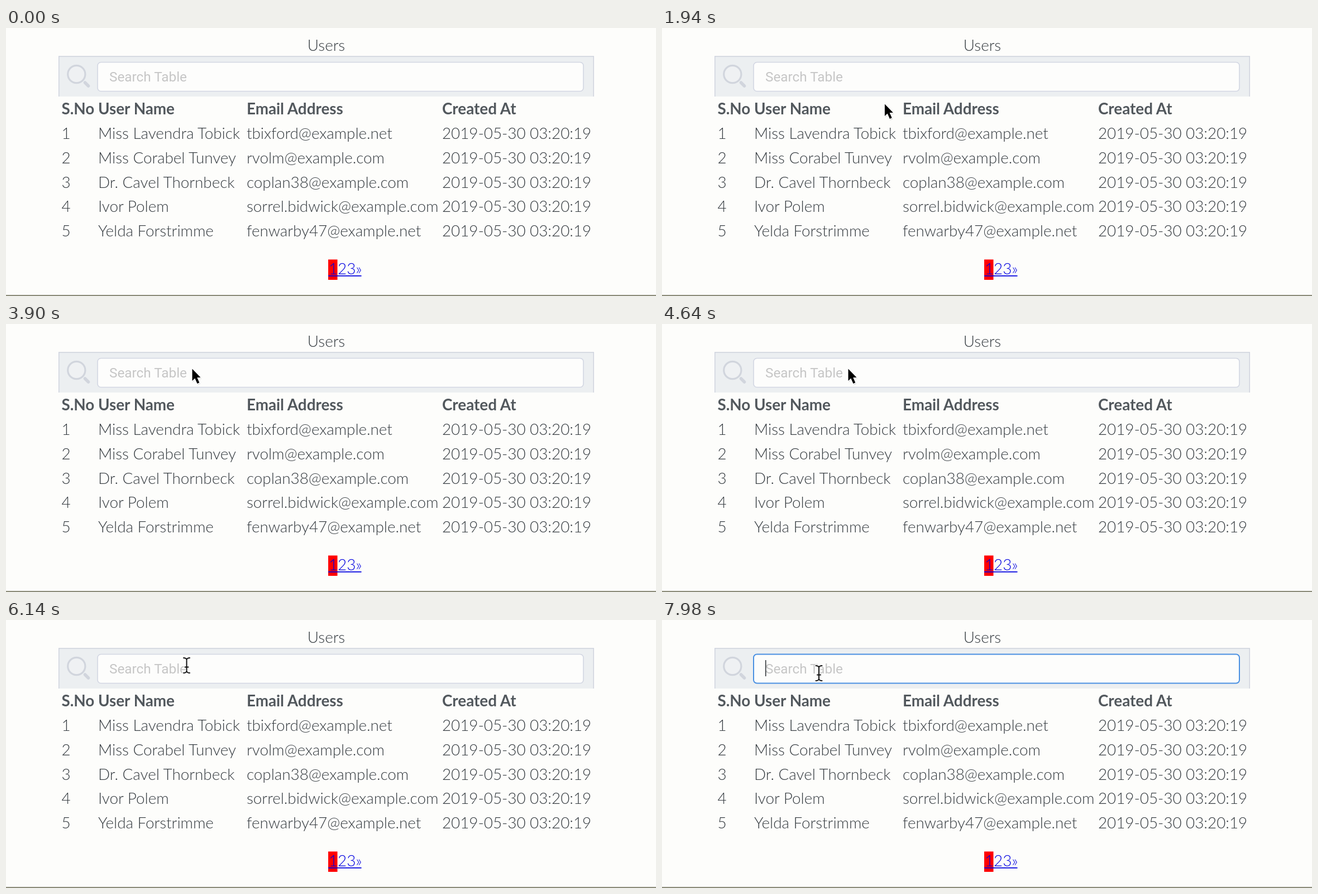
An HTML page that plays this animation: 1164 px wide and 481 px high, repeating every 8000 ms.

```html
<!DOCTYPE html>
<html lang="en">
<head>
<meta charset="utf-8">
<title>Users</title>
<style>
  html, body { margin: 0; width: 100%; height: 100%; overflow: hidden; background: #fdfdfb; }
  svg { display: block; width: 1164px; height: 481px; }
  text { font: 300 27.8px Lato, "Open Sans", sans-serif; fill: #353b40; white-space: pre; }
  .head { font-weight: 700; fill: #52585d; }
  .hint { font: 400 24.3px Roboto, Inter, sans-serif; fill: #c6c6c6; }
  .link { fill: #0000e0; }
</style>
</head>
<body>
<svg viewBox="0 0 1164 481">
  <rect width="1164" height="481" fill="#fdfdfb"/>
  <text x="573.5" y="41" text-anchor="middle">Users</text>

  <rect x="94" y="50" width="959" height="73" fill="#eceff1"/>
  <path d="M94.75 123V51H1052.25V123" fill="none" stroke="#cfd3de" stroke-width="1.5"/>
  <circle cx="126.3" cy="83" r="15.6" fill="#eff1f3" stroke="#d1d5dd" stroke-width="3.2"/>
  <path d="M141.5 98L147.5 104" stroke="#d1d5dd" stroke-width="5.5" stroke-linecap="round"/>
  <rect id="field" x="164" y="61.5" width="870" height="52" rx="6" fill="#fdfdfc"/>
  <text class="hint" x="185" y="96">Search Table</text>
  <path id="caret" d="M185.7 72V101" stroke="#303438" stroke-width="1.6"/>

  <g id="table"></g>

  <rect x="577" y="415.5" width="16.5" height="36.5" fill="#f00"/>
  <text class="link" x="578" y="442">123»</text>
  <path d="M577 444.8H636.5" stroke="#0000e0" stroke-width="1.8"/>
  <path d="M0 480H1164" stroke="#66664f" stroke-width="1.4"/>

  <g id="arrow" stroke-linejoin="round">
    <path d="M1 2V24L6 19L10 29L14.5 27L10.5 18H17Z" fill="#000" opacity=".14"/>
    <path d="M0 0V21.5L4.8 17L9 26.5L12.8 24.8L8.7 15.6H15Z"
      fill="#000" stroke="#fff" stroke-width="3" paint-order="stroke"/>
  </g>
  <g id="beam" fill="none" stroke-linecap="round">
    <path id="halo" stroke="#fff" stroke-width="4.5"/>
    <path id="stem" stroke="#111" stroke-width="2"/>
  </g>
</svg>
<script>
const LOOP = 8000;
const FOCUS_AT = 7400;
const BEAM_AT = 5900;
const SHOW_AT = 200;
const $ = id => document.getElementById(id);

const columns = [99.5, 165, 431, 781];
const created = "2019-05-30 03:20:19";
const people = [
  ["Miss Lavendra Tobick", "tbixford@example.net"],
  ["Miss Corabel Tunvey", "rvolm@example.com"],
  ["Dr. Cavel Thornbeck", "coplan38@example.com"],
  ["Ivor Polem", "sorrel.bidwick@example.com"],
  ["Yelda Forstrimme", "fenwarby47@example.net"]
];

function addRow(cells, y, className = "") {
  cells.forEach((cell, i) => {
    const text = document.createElementNS("http://www.w3.org/2000/svg", "text");
    text.setAttribute("x", columns[i]);
    text.setAttribute("y", y);
    text.setAttribute("class", className);
    text.textContent = cell;
    $("table").append(text);
  });
}

addRow(["S.No", "User Name", "Email Address", "Created At"], 155, "head");
people.forEach((person, i) => addRow([i + 1, ...person, created], 199 + i * 43.8));

const beamShape = "M-5.5-13.5Q-1-13.5 0-10.5Q1-13.5 5.5-13.5M0-10.5V10.5" +
  "M-5.5 13.5Q-1 13.5 0 10.5Q1 13.5 5.5 13.5M-3 3H3";
$("halo").setAttribute("d", beamShape);
$("stem").setAttribute("d", beamShape);

// Pointer stops: time, x, y
const stops = [
  [SHOW_AT, 520, 481], [900, 467.5, 139], [1500, 467.5, 139], [2300, 348.5, 134.5],
  [3000, 348.5, 134.5], [3700, 333.5, 80.5], [5600, 333.5, 80.5], [6050, 323.5, 81.5],
  [6500, 323.5, 81.5], [7200, 281, 95.5], [LOOP, 281, 95.5]
];

function pointerAt(time) {
  const next = Math.max(1, stops.findIndex(stop => stop[0] >= time));
  const [t0, x0, y0] = stops[next - 1];
  const [t1, x1, y1] = stops[next];
  const k = Math.max(0, (time - t0) / (t1 - t0));
  const ease = k * k * (3 - 2 * k);
  return [x0 + (x1 - x0) * ease, y0 + (y1 - y0) * ease];
}

const show = (id, on) => $(id).setAttribute("visibility", on ? "visible" : "hidden");

function draw(time) {
  const place = `translate(${pointerAt(time)})`;
  const focused = time >= FOCUS_AT;
  $("arrow").setAttribute("transform", place);
  $("beam").setAttribute("transform", place);
  show("arrow", time >= SHOW_AT && time < BEAM_AT);
  show("beam", time >= BEAM_AT);
  show("caret", focused);
  $("field").setAttribute("stroke", focused ? "#4a90e2" : "#d2d6e2");
  $("field").setAttribute("stroke-width", focused ? 2 : 1.6);
}

function tick() {
  draw(performance.now() % LOOP);
  requestAnimationFrame(tick);
}
tick();
</script>
</body>
</html>
```
